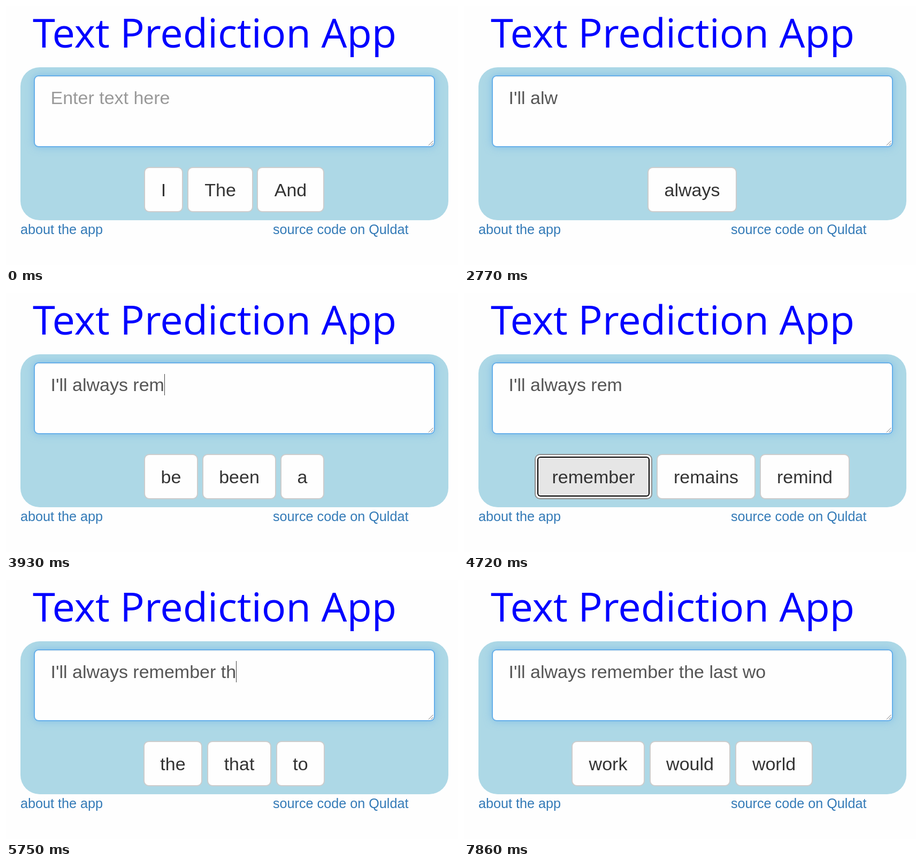
Write an HTML page with a canvas that moves like this. It is 845 px wide and 486 px high and loops after 8000 ms.

```html
<!DOCTYPE html>
<html lang="en">
<head>
<meta charset="utf-8">
<title>Text Prediction App</title>
<style>
  html, body { margin: 0; width: 100%; height: 100%; overflow: hidden; background: #fefefe; }
  canvas { display: block; }
</style>
</head>
<body>
<canvas id="stage" width="845" height="486"></canvas>
<script>
const ctx = document.getElementById('stage').getContext('2d');
const SANS = '"Liberation Sans", Arial, sans-serif';
const LOOP = 8000, BLINK = 530, FADE = 150, STEP = 68, REPLY = 272;
const TEXT_X = 83.5, CARET_X = 84;
const SENTENCE = "I'll always remember the last wo";

// Presses on the first suggestion; the reply follows REPLY ms later.
const CLICKS = [2990, 4720];

// [time, characters shown]
const TYPING = [
  [260, 0], [720, 1], [1050, 2], [1450, 3], [1590, 4],
  [1850, 5], [1980, 6], [2110, 7], [2240, 8],
  [CLICKS[0] + REPLY, 12], [3660, 13], [3730, 14], [3930, 15],
  [CLICKS[1] + REPLY, 21], [5480, 22], [5750, 23], [5880, 24], [5950, 25],
  [6150, 26], [6280, 27], [6350, 28], [6610, 29], [6870, 30],
  [7200, 31], [7330, 32]
];

// [time, ...[word, left, right]]; every row is centred on x = 426.5
const ROWS = [
  [0, ['I', 258, 331], ['The', 339, 462], ['And', 469, 595]],
  [1520, ['have', 232, 370], ['was', 378, 503], ['am', 511, 621]],
  [2570, ['always', 343, 510]],
  [CLICKS[0] + REPLY, ['be', 258, 359], ['been', 367, 505], ['a', 513, 595]],
  [4330, ['remember', 132, 352], ['remains', 360, 545], ['remind', 553, 721]],
  [CLICKS[1] + REPLY, ['the', 257, 367], ['that', 376, 496], ['to', 505, 596]],
  [7730, ['work', 201, 338], ['would', 347, 498], ['world', 507, 652]]
];

const latest = (list, t) => list.filter(e => e[0] <= t).pop();
const ease = p => p * p * (3 - 2 * p);
const clamp = p => Math.max(0, Math.min(1, p));

function text(str, x, y, size, color, family = SANS, align = 'left') {
  ctx.font = `${size}px ${family}`;
  ctx.textAlign = align;
  ctx.fillStyle = color;
  ctx.fillText(str, x, y);
}

function box(x, y, w, h, r, color) {
  ctx.beginPath();
  ctx.roundRect(x, y, w, h, r);
  ctx.fillStyle = color;
  ctx.fill();
}

function line(x1, y1, x2, y2) {
  ctx.beginPath();
  ctx.moveTo(x1, y1);
  ctx.lineTo(x2, y2);
  ctx.stroke();
}

// Focus strength of the text field, advancing in short visible steps.
function focusAt(t) {
  const start = CLICKS.filter(c => c <= t).pop();
  if (start === undefined) return 1;
  const dt = Math.floor((t - start) / STEP) * STEP;
  return ease(clamp(dt < REPLY ? 1 - dt / FADE : (dt - REPLY) / (FADE - 15)));
}

function drawField(focus) {
  const mix = (a, b) => Math.round(a + (b - a) * focus);
  ctx.save();
  ctx.shadowColor = `rgba(102,175,233,${0.6 * focus})`;
  ctx.shadowBlur = 14.4;
  box(52, 130, 750, 135, 9, `rgb(${mix(204, 102)},${mix(204, 175)},${mix(204, 233)})`);
  ctx.restore();
  box(54, 132, 746, 131, 7, '#fefefe');
  ctx.fillStyle = 'rgba(0,0,0,0.04)';
  ctx.fillRect(61, 132, 732, 2);
  ctx.strokeStyle = '#777';
  ctx.lineWidth = 1;
  line(790, 261.5, 798.5, 253);
  line(794.5, 261.5, 798.5, 257.5);
}

function drawInput(t, clicked) {
  const [since, count] = latest(TYPING, t) || [-1, 0];
  const shown = SENTENCE.slice(0, count);
  if (count) text(shown, TEXT_X, 184, 34, '#555');
  else text('Enter text here', TEXT_X, 184, 34, '#999');
  if (since >= 0 && !clicked && (t - since) % (2 * BLINK) < BLINK) {
    ctx.font = `34px ${SANS}`;
    const x = Math.floor(CARET_X + ctx.measureText(shown).width + 0.4);
    ctx.fillStyle = '#444';
    ctx.fillRect(x, 152, 1, 40);
  }
}

function drawButton([word, left, right], pressed) {
  const w = right - left;
  const ring = (inset, r, color) =>
    box(left + inset, 302 + inset, w - 2 * inset, 85 - 2 * inset, r, color);
  ring(0, 10, pressed ? '#8c8c8c' : '#ccc');
  ring(2, 8, '#fefefe');
  if (pressed) {
    ring(5, 6, '#000');
    ring(7, 4, '#e6e6e6');
  }
  text(word, (left + right) / 2, 357, 34, '#333', SANS, 'center');
}

function draw(t) {
  const clicked = CLICKS.some(c => t >= c && t < c + REPLY);
  ctx.fillStyle = '#fefefe';
  ctx.fillRect(0, 0, 845, 486);
  text('Text Prediction App', 50, 78, 75.6, '#00f', '"Open Sans", sans-serif');
  box(27, 115, 800, 287, 36, '#add8e6');
  drawField(focusAt(t));
  drawInput(t, clicked);
  latest(ROWS, t).slice(1).forEach((b, i) => drawButton(b, clicked && i === 0));
  text('about the app', 27, 428, 25.2, '#337ab7');
  text('source code on Quldat', 499, 428, 25.2, '#337ab7');
}

const begin = performance.now();
function tick() {
  draw((performance.now() - begin) % LOOP);
  requestAnimationFrame(tick);
}
tick();
</script>
</body>
</html>
```
